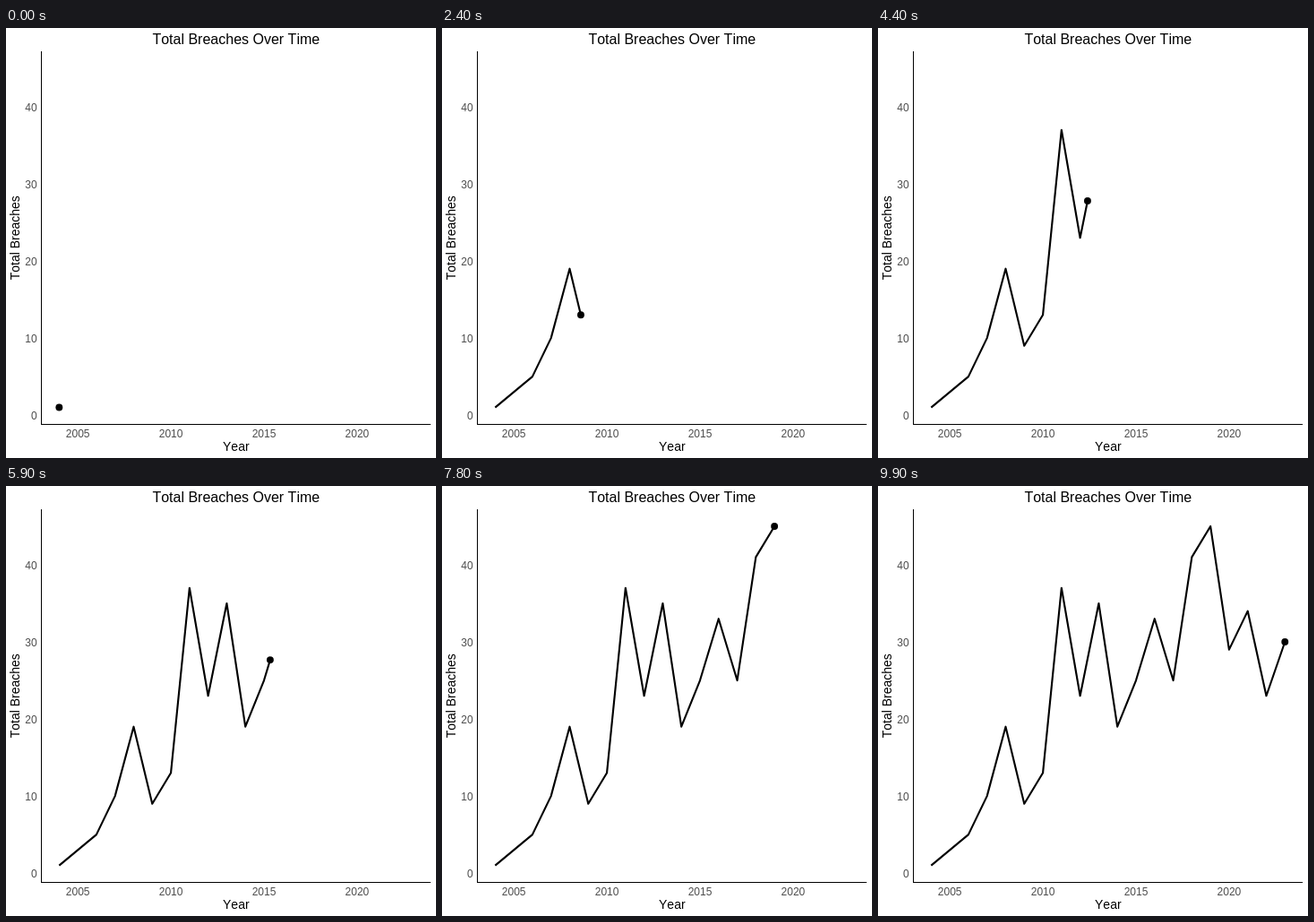
These frames come from a looping animation (480 px wide and 480 px high, 10000 ms). An HTML page with a canvas:

```html
<!DOCTYPE html>
<html lang="en">
<head>
<meta charset="utf-8">
<title>Total Breaches Over Time</title>
<style>
html, body { margin: 0; width: 100%; height: 100%; overflow: hidden; background: #fff; }
canvas { display: block; width: 480px; height: 480px; }
</style>
</head>
<body>
<canvas id="chart"></canvas>
<script>
const SIZE = 480, STEP = 100, LOOP = 10000;
const LAST = LOOP / STEP - 1;
const FIRST_YEAR = 2004;
const totals = [1, 3, 5, 10, 19, 9, 13, 37, 23, 35, 19, 25, 33, 25, 41, 45, 29, 34, 23, 30];
const panel = { left: 39.6, right: 474, top: 26, bottom: 442.5 };

const canvas = document.getElementById('chart');
const ctx = canvas.getContext('2d');
const ratio = window.devicePixelRatio || 1;
canvas.width = canvas.height = SIZE * ratio;
ctx.scale(ratio, ratio);

// Axes carry 5% padding on both ends of the data range.
const spanX = totals.length - 1;
const unitX = (panel.right - panel.left) / (spanX * 1.1);
const low = Math.min(...totals), spanY = Math.max(...totals) - low;
const unitY = (panel.bottom - panel.top) / (spanY * 1.1);
const px = k => panel.left + (k + spanX * 0.05) * unitX;
const py = v => panel.bottom - (v - low + spanY * 0.05) * unitY;

// Each year lands on a whole step.
const keys = totals.map((_, k) => Math.round(k * LAST / spanX));

function label(str, x, y, size, align = 'center', color = '#000') {
  ctx.font = size + 'px "Liberation Sans", Arial, sans-serif';
  ctx.fontKerning = 'none';
  ctx.textAlign = align;
  ctx.fillStyle = color;
  ctx.fillText(str, x, y);
}

function drawAxes() {
  const midX = (panel.left + panel.right) / 2;
  const midY = (panel.top + panel.bottom) / 2;
  const grey = '#4d4d4d';
  ctx.fillStyle = '#000';
  ctx.fillRect(39, 26, 1, 417);
  ctx.fillRect(39, 442, 435, 1);
  for (let v = 0; v <= 40; v += 10) label(v, 34.7, py(v) + 4.6, 12, 'right', grey);
  for (let y = 2005; y <= 2020; y += 5) label(y, px(y - FIRST_YEAR), 457, 12, 'center', grey);
  label('Total Breaches Over Time', midX, 18, 16);
  label('Year', midX, 472, 14);
  ctx.save();
  ctx.translate(15.3, midY);
  ctx.rotate(-Math.PI / 2);
  label('Total Breaches', 0, 0, 14);
  ctx.restore();
}

function drawSeries(step) {
  let k = 0;
  while (k < spanX && keys[k + 1] <= step) k++;
  let at = k, value = totals[k];
  if (k < spanX) {
    const f = (step - keys[k]) / (keys[k + 1] - keys[k]);
    at += f;
    value += (totals[k + 1] - totals[k]) * f;
  }
  ctx.strokeStyle = ctx.fillStyle = '#000';
  ctx.lineWidth = 2.13;
  ctx.lineJoin = 'round';
  ctx.beginPath();
  for (let i = 0; i <= k; i++) ctx.lineTo(px(i), py(totals[i]));
  ctx.lineTo(px(at), py(value));
  ctx.stroke();
  ctx.beginPath();
  ctx.arc(px(at), py(value), 3.95, 0, Math.PI * 2);
  ctx.fill();
}

function draw(time) {
  ctx.fillStyle = '#fff';
  ctx.fillRect(0, 0, SIZE, SIZE);
  drawAxes();
  drawSeries(Math.floor((time % LOOP) / STEP));
}

const start = performance.now();
function tick() {
  draw(performance.now() - start);
  requestAnimationFrame(tick);
}
tick();
</script>
</body>
</html>
```
